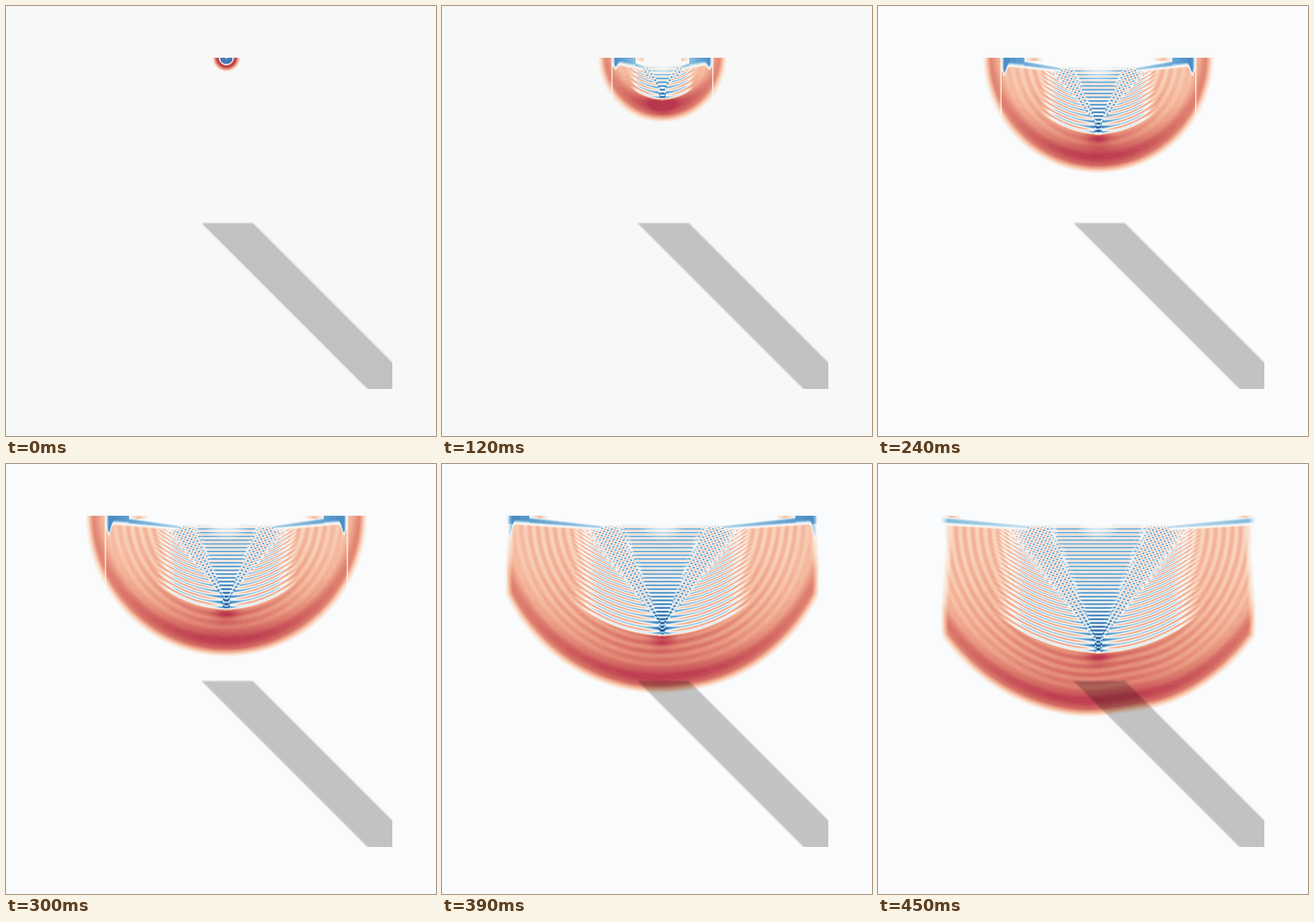
An HTML page with a canvas for the animation above (480 ms loop, 640 px wide and 640 px high).

```html
<!DOCTYPE html>
<html lang="en">
<head>
<meta charset="utf-8">
<title>Wave field</title>
<style>
  html, body { margin: 0; width: 100%; height: 100%; overflow: hidden; background: #f8fafa; }
  canvas { display: block; }
</style>
</head>
<body>
<canvas id="stage" width="640" height="640"></canvas>
<script>
const ctx = document.getElementById('stage').getContext('2d');
const STEP_MS = 30, STEPS = 16;
const BOX = { x: 90, y: 77, w: 478, h: 304 };
const CENTER_X = 328, HALF_WIDTH = 235;
const REDS = [[250, 222, 204], [244, 180, 152], [228, 140, 120], [208, 98, 95], [185, 55, 78]];
const BLUES = [[205, 228, 241], [140, 190, 222], [88, 155, 205], [62, 110, 170], [45, 80, 145]];

const clamp = v => Math.min(1, Math.max(0, v));
const mix = (a, b, t) => a + (b - a) * t;
const bell = v => Math.exp(-v * v);
const wave = (v, period) => Math.cos(2 * Math.PI * v / period);
const ramp = (a, b, v) => { const t = clamp((v - a) / (b - a)); return t * t * (3 - 2 * t); };

const background = step => step < 6 ? [247, 249, 248] : [249, 251, 252];

// Signed field strength; x is measured from the centre line, y from the surface.
function field(step, x, y) {
  const ax = Math.abs(x), r = Math.hypot(x, y) || 0.01, c = y / r;
  if (!step) return spark(r);

  const late = Math.max(0, step - 12);
  const front = 21 + 18.9 * step - late * (1 + 5 * (1 - c) + 1.5 * bell((x - 40) / 50));
  const s = front - r;
  const corner = Math.sqrt(Math.max(0, front * front - HALF_WIDTH ** 2));
  const limit = HALF_WIDTH - (y < 12 ? 0 : 6 * clamp((corner - 40 - y) / 80));
  const edge = Math.min(s, limit - ax);
  if (edge <= 0) return 0;

  const depth = 13 + 12.9 * step;
  const legTop = 7 * step;
  const q = y + ax * ax / (2 * depth) - depth;

  // Broad leading pulse with fine trailing rings
  let v = 0.33 + 0.35 * c ** 3 + 0.3 * bell((s - 10 - 15 * c) / 12);
  v += 0.08 * clamp((s - 25) / 40) * wave(s - 25, 12.5);
  v += 0.3 * bell(q / 14) * bell(x / 18);

  // Slower dispersive cone
  const inside = (1 - ramp(0.5 * depth, 0.78 * depth, ax)) * clamp(-q / 6);
  if (inside > 0) v = mix(v, cone(ax, y, q, depth, legTop, r), inside);

  return surface(v, ax, y, step, legTop) * clamp(edge / 12);
}

function spark(r) {
  if (r > 21) return 0;
  if (r < 3) return -0.2 - 0.2 * r;
  if (r < 9.5) return -0.75;
  return r < 14 ? 0.95 * clamp((r - 10) / 2) : 0.95 * clamp((21 - r) / 7);
}

function cone(ax, y, q, depth, legTop, r) {
  const up = -q;
  const leg = Math.max(4, legTop * (1 - (y - 15) / Math.max(20, depth - 30)));
  const h = ax / leg;
  const wings = 0.06 + 0.4 * wave(up, 9 - 3 * clamp(up / depth));
  const stripes = -0.12 + 0.42 * wave(y, 5.6);
  const hatch = -0.02 + 0.3 * wave(ax + 0.62 * y, 7) + 0.3 * wave(y - 0.3 * ax, 5.5);
  let v = mix(stripes, hatch, ramp(0.55, 0.8, h));
  v = mix(v, wings, ramp(1.15, 1.45, h));
  v -= 0.75 * Math.exp(-up / (depth * 0.24)) * bell(ax / (10 + 0.55 * up));
  return v * clamp((r - 10) / Math.min(28, depth / 3));
}

// Thin blue band under the surface, ending in a hooked head.
function surface(v, ax, y, step, legTop) {
  const head = 4 + 17.5 * step;
  if (ax > head) return v * clamp((ax - head) / 3);
  const f = clamp((ax - legTop) / (head - legTop));
  const mid = Math.min(17, 10 + step) - 13 * f;
  if (ax < legTop) return v * clamp((y - mid + 4) / 6);

  const isHead = ax > head - 34;
  const half = 2.5 + 3.5 * f;
  const top = isHead ? -9 : mid - half;
  const bottom = mid + half + (isHead ? (2 + 1.5 * step) * bell((head - 4 - ax) / 4) : 0);
  if (y < top) return ax > head - 62 && y < 5 ? 0.32 * bell((head - 48 - ax) / 10) : 0;
  if (y > bottom) return v * clamp((y - bottom) / 3.5);
  const t = isHead ? clamp((bottom - y) / 5) * clamp((head - ax) / 4) : 1 - ((y - mid) / half) ** 2;
  return -t * (0.3 + 0.4 * f) * (step > 13 ? 0.75 : 1);
}

function paintField(step) {
  const image = ctx.createImageData(BOX.w, BOX.h);
  const base = background(step);
  const scales = [[base, ...REDS], [base, ...BLUES]];
  let k = 0;
  for (let y = 0; y < BOX.h; y++) {
    for (let x = 0; x < BOX.w; x++) {
      const v = field(step, x + BOX.x + 0.5 - CENTER_X, y + 0.5);
      const scale = scales[v < 0 ? 1 : 0];
      const level = Math.round(clamp(Math.abs(v)) * 24) / 24 * 5;
      const i = Math.min(4, Math.floor(level));
      for (let ch = 0; ch < 3; ch++) {
        image.data[k++] = mix(scale[i][ch], scale[i + 1][ch], level - i);
      }
      image.data[k++] = 255;
    }
  }
  return image;
}

function drawBar() {
  ctx.save();
  ctx.beginPath();
  ctx.rect(0, 0, 575, 570);
  ctx.clip();
  ctx.filter = 'blur(1px)';
  ctx.fillStyle = 'rgba(0, 0, 0, 0.222)';
  ctx.beginPath();
  ctx.moveTo(291, 323);
  ctx.lineTo(367.5, 323);
  ctx.lineTo(615, 570.5);
  ctx.lineTo(615, 647);
  ctx.closePath();
  ctx.fill();
  ctx.restore();
}

const fields = [];

function draw(time) {
  const step = Math.floor(time / STEP_MS) % STEPS;
  fields[step] ??= paintField(step);
  ctx.fillStyle = `rgb(${background(step)})`;
  ctx.fillRect(0, 0, 640, 640);
  ctx.putImageData(fields[step], BOX.x, BOX.y);
  drawBar();
  requestAnimationFrame(draw);
}

draw(0);
</script>
</body>
</html>
```
